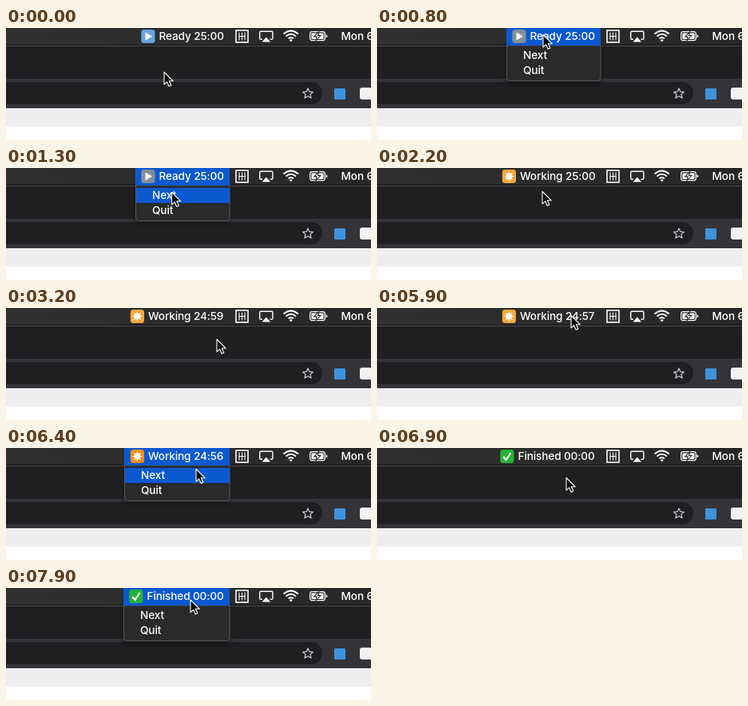
Write an HTML page that moves like this. It is 457 px wide and 141 px high and loops after 8 s.

```html
<!DOCTYPE html>
<html lang="en">
<head>
<meta charset="utf-8">
<title>Menu bar timer</title>
<style>
html, body { margin: 0; width: 100%; height: 100%; overflow: hidden; background: #fff; }
svg { display: block; width: 457px; height: 141px; }
text { font: 500 13.6px Inter, Roboto, sans-serif; letter-spacing: -.12px; fill: #fff; }
</style>
</head>
<body>
<svg viewBox="0 0 457 141">
  <defs>
    <linearGradient id="bar">
      <stop offset="0" stop-color="#303031"/>
      <stop offset="1" stop-color="#272728"/>
    </linearGradient>
    <filter id="shade" x="-20%" y="-30%" width="140%" height="180%">
      <feDropShadow dx="0" dy="3" stdDeviation="3" flood-opacity=".45"/>
    </filter>
  </defs>

  <!-- browser window -->
  <rect width="457" height="141" fill="#fff"/>
  <rect y="100" width="457" height="24" fill="#eeedf0"/>
  <rect y="22" width="457" height="43" fill="#202023"/>
  <rect y="64" width="457" height="37" fill="#343438"/>
  <rect x="-40" y="68" width="436" height="28" rx="14" fill="#1f1f22"/>
  <path d="M378 76l1.9 4.2 4.6.4-3.5 3 1.1 4.5-4.1-2.4-4.1 2.4 1.1-4.5-3.5-3 4.6-.4z" fill="none" stroke="#c4c4c8" stroke-width="1.3" stroke-linejoin="round"/>
  <rect x="411" y="76" width="14" height="14" rx="1" fill="#3f92dc"/>
  <rect x="443" y="75" width="16" height="15" rx="3" fill="#f2f2f2"/>

  <!-- system menu bar -->
  <rect width="457" height="22" fill="url(#bar)"/>
  <rect y="21" width="457" height="1" fill="#111113"/>
  <rect y="22" width="457" height="1" fill="#505053"/>
  <g fill="none" stroke="#fff">
    <rect x="288" y="3" width="15" height="15" stroke-width="1.6"/>
    <path d="M292 5.5v5M295.5 5.5v10M299 5.5v5M291 10.5h9M292 10.5v5M299 10.5v5" stroke-width="1.1"/>
    <path d="M321 14.2h-2q-1.3 0-1.3-1.3V5.500q0-1.300 1.300-1.300h13.600q1.300 0 1.300 1.300v7.400q0 1.300-1.300 1.300h-2" stroke-width="1.4"/>
    <path d="M347.500 7.500q9.200-8 18.400 0M350.500 10.500q6.200-5.400 12.400 0M353.500 13.300q3.200-2.700 6.400 0" stroke-width="1.9"/>
    <rect x="380.700" y="4.700" width="18.600" height="11" rx="2.800" stroke-width="1.2"/>
  </g>
  <g fill="#fff">
    <path d="M325.800 11.500l5.200 6h-10.400zM356.700 14l2 1.200-2 2.300-2-2.300z"/>
    <rect x="382.400" y="6.400" width="15.200" height="7.600" rx="1.300"/>
    <path d="M400.500 8.300q1.900.5 1.900 1.900t-1.900 1.900z"/>
  </g>
  <path d="M391.800 4.500l-6 6.400h3.400l-1.200 5 6-6.500h-3.400z" fill="#fff" stroke="#29292a" stroke-width="1.100"/>
  <text x="419.500" y="15">Mon 6</text>

  <!-- timer and its menu -->
  <g id="menu">
    <path id="panel" stroke="#59595c" fill="#29292c" filter="url(#shade)"/>
    <rect id="title" height="22" fill="#0b59d1"/>
    <rect id="hover" y="25" height="19" fill="#0b59d1"/>
    <text id="next" y="39">Next</text>
    <text id="quit" y="58">Quit</text>
  </g>
  <g id="icon">
    <rect id="tile" x=".3" y="2" width="17.200" height="17" rx="3.500"/>
    <path id="mark"/>
  </g>
  <text id="label" y="15"></text>
  <path id="cursor" d="M0 .5v15.700l3.600-3.400 2.500 5.700 2.700-1.200-2.500-5.500h5z" fill="#080808" stroke="#fff" stroke-width="1.100" stroke-linejoin="round"/>
</svg>
<script>
const LOOP = 8000, STEP = 100;
const $ = id => document.getElementById(id);
const set = (id, attrs) => {
  for (const k in attrs) $(id).setAttribute(k, attrs[k]);
};

// Eight-pointed star centred on the tile
const star = Array.from({ length: 16 }, (_, i) => {
  const r = i % 2 ? 3.3 : 6.6, a = i * Math.PI / 8;
  return (i ? 'L' : 'M') + (8.9 + r * Math.sin(a)).toFixed(2) + ' ' + (10.5 - r * Math.cos(a)).toFixed(2);
}).join('') + 'Z';

const looks = {
  Ready: { tile: '#69a5dc', active: '#858f9b', mark: 'M5.500 5.500l8.500 5-8.500 5z' },
  Working: { tile: '#f3a83c', active: '#f08f22', mark: star },
  Finished: { tile: '#25b335', active: '#25b335', mark: 'M4.300 11l3.200 4 6-9', line: true }
};

// start, state, clock, text x
const states = [
  [0, 'Ready', '25:00', 191.5],
  [2100, 'Working', '25:00', 179],
  [3200, 'Working', '24:59', 178],
  [4200, 'Working', '24:58', 178],
  [5200, 'Working', '24:57', 179],
  [6200, 'Working', '24:56', 178],
  [6800, 'Finished', '00:00', 176.5]
];

// open, blink, fade, closed, left edge
const menus = [
  [800, 1800, 2000, 2100, 162],
  [6000, 6600, 6700, 6800, 148],
  [7900, 9000, 9000, 9000, 147]
];

// time, x, y of the pointer tip
const path = [
  [0, 198, 55], [500, 208, 8], [800, 208, 8], [1300, 207.500, 30], [1800, 207.500, 30],
  [2200, 207, 29], [2700, 264, 39], [5400, 264, 39], [5900, 243, 9], [6100, 243, 9],
  [6400, 238, 26], [6700, 238, 26], [6900, 237, 37], [7400, 237, 37], [7700, 231, 14.500], [LOOP, 231, 14.500]
];

function pointerAt(t) {
  const i = path.findIndex(p => p[0] > t);
  const [t0, x0, y0] = path[i - 1], [t1, x1, y1] = path[i];
  const u = (t - t0) / (t1 - t0), k = u * u * (3 - 2 * u);
  return [x0 + (x1 - x0) * k, y0 + (y1 - y0) * k];
}

function drawMenu(t, y) {
  const m = menus.find(m => t >= m[0] && t < m[3]);
  $('menu').style.display = m ? '' : 'none';
  if (!m) return false;
  const [, blink, fade, , left] = m;
  const width = 280 - left, faded = t >= fade;
  const lit = y >= 25 && !(t >= blink && t < blink + STEP);
  set('menu', { opacity: faded ? .5 : 1 });
  set('panel', { d: `M${left + .5} 22V62.500q0 4 4 4H276q4 0 4-4V22z` });
  set('title', { x: left, width, opacity: faded ? 0 : 1 });
  set('hover', { x: left + 1, width: width - 1, opacity: lit ? 1 : 0 });
  set('next', { x: left + 21 });
  set('quit', { x: left + 21 });
  return !faded;
}

function render(t) {
  t = Math.floor(t / STEP) * STEP;
  const [px, py] = pointerAt(t);
  const active = drawMenu(t, py);
  const [, name, clock, x] = states.filter(s => s[0] <= t).pop();
  const look = looks[name];
  set('icon', { transform: `translate(${x - 22.500})` });
  set('tile', { fill: active ? look.active : look.tile });
  set('mark', {
    d: look.mark,
    fill: look.line ? 'none' : '#fff',
    stroke: look.line ? '#fff' : 'none',
    'stroke-width': 2.2
  });
  set('label', { x });
  $('label').textContent = name + ' ' + clock;
  set('cursor', { transform: `translate(${px} ${py})` });
}

const start = performance.now();
function tick() {
  render((performance.now() - start) % LOOP);
  requestAnimationFrame(tick);
}
tick();
</script>
</body>
</html>
```
